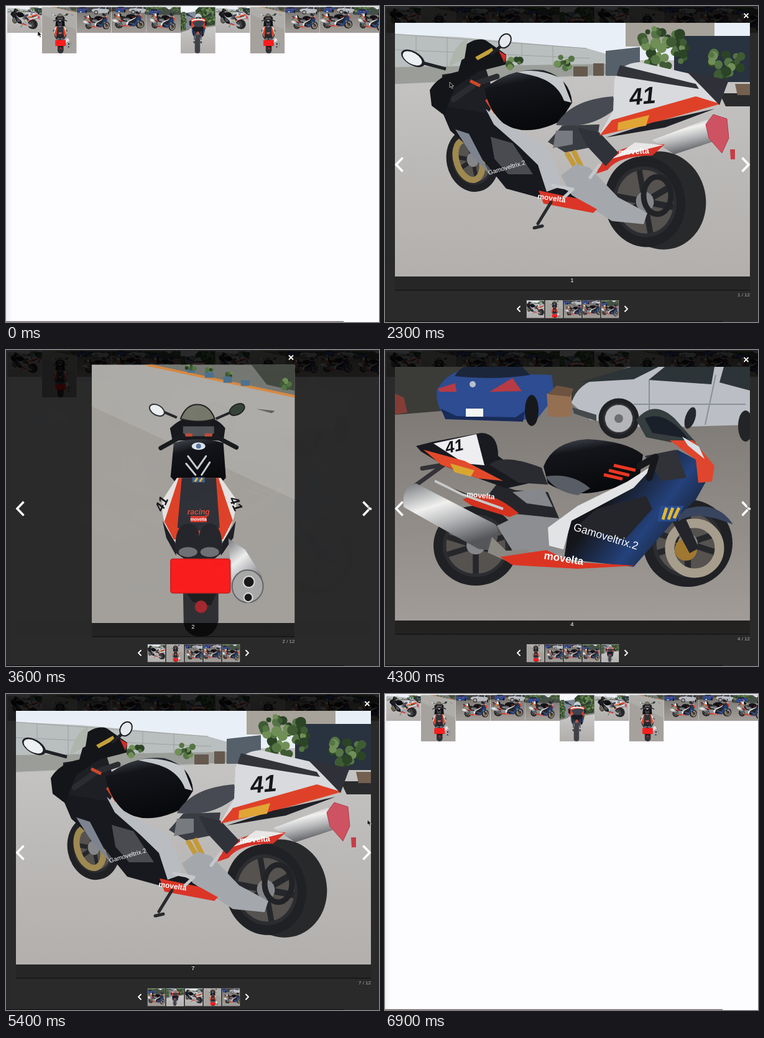
Animation, 600 px wide and 507 px high, one loop 7 s. Source, as an HTML page:

```html
<!DOCTYPE html>
<html lang="en">
<head>
<meta charset="utf-8">
<title>Photo lightbox</title>
<style>
html, body { margin: 0; width: 100%; height: 100%; overflow: hidden; background: #fdfcfe }
svg { display: block; width: 600px; height: 507px }
text { font-family: "Liberation Sans", Arial, sans-serif; fill: #fff }
.num { font-weight: 900; font-style: italic; fill: #16161a }
.line { fill: none; stroke-linecap: round; stroke-linejoin: round }
</style>
</head>
<body>
<svg id="stage" viewBox="0 0 600 507">
<defs>
  <linearGradient id="edge"><stop stop-color="#eeeef0"/><stop offset="1" stop-color="#fdfcfe"/></linearGradient>
  <linearGradient id="yard" x2="0" y2="1"><stop stop-color="#cbcac9"/><stop offset=".5" stop-color="#bcbab8"/><stop offset="1" stop-color="#b1aeac"/></linearGradient>
  <linearGradient id="floor" x2="0" y2="1"><stop stop-color="#77736f"/><stop offset="1" stop-color="#a39e99"/></linearGradient>
  <linearGradient id="steel" x2=".45" y2="1"><stop stop-color="#74777a"/><stop offset=".4" stop-color="#f0f0ef"/><stop offset=".65" stop-color="#b5b6b8"/><stop offset="1" stop-color="#55565a"/></linearGradient>
  <linearGradient id="paint" x2="1" y2=".6"><stop offset=".4" stop-color="#15161b"/><stop offset=".7" stop-color="#24427c"/><stop offset="1" stop-color="#15161b"/></linearGradient>
  <linearGradient id="gloss" x2=".3" y2="1"><stop stop-color="#4b505a"/><stop offset=".3" stop-color="#14151a"/><stop offset="1" stop-color="#08090c"/></linearGradient>

  <g id="wheel">
    <circle r="50" fill="#202124"/><circle r="38" fill="#55524f"/>
    <path d="M0,-38V38M-36,-12 36,12M-36,12 36,-12" stroke="#26272b" stroke-width="7"/>
    <circle r="37" fill="none" stroke="#2c2d31" stroke-width="4"/><circle r="11" fill="#85868a"/>
  </g>

  <g id="sideBike">
    <use href="#wheel" transform="translate(146 314) scale(1.36 1.28)"/>
    <use href="#wheel" transform="translate(487 310) scale(1.44 1.4)"/>
    <circle cx="498" cy="318" r="40" fill="none" stroke="#a69d8d" stroke-width="15"/>
    <circle cx="484" cy="320" r="18" fill="#a07832"/>
    <path d="M455,262 478,258 505,318 490,326Z" fill="#23252b"/>
    <path d="M470,260Q530,235 560,280Q500,255 472,275Z" fill="#39455f"/>
    <path d="M180,282 230,258 280,270 290,325 210,330Z" fill="#8c8e91"/>
    <path d="M180,215 210,225 262,228 280,270 200,262 160,240Z" fill="#25262b"/>
    <path d="M205,228 255,222 270,252 228,246Z" fill="#85878c"/>
    <path d="M125,240Q165,218 215,262L200,268 140,250Z" fill="#d5321f"/>
    <path d="M80,210 125,232 190,255" stroke="#c8c9ca" stroke-width="4"/>
    <path d="M60,190 95,184 48,218" class="line" stroke="#333238" stroke-width="7"/>
    <path d="M30,252Q26,218 50,214L178,280Q188,298 172,322L150,319Z" fill="url(#steel)"/>
    <path d="M172,300 195,322 230,320 245,340 210,345 165,325Z" fill="#8b8781"/>
    <path d="M50,154 78,147 155,133Q182,134 182,170L240,212 195,222 100,188 58,163Z" fill="#191a20"/>
    <path d="M78,150 147,135 160,185 128,182Z" fill="#eeeef0"/>
    <path d="M62,160 128,178 190,210 150,206 90,184Z" fill="#e34a2b"/>
    <text class="num" transform="translate(99 166) rotate(-12)" font-size="26">41</text>
    <path d="M105,182 144,193 138,203 112,196Z" fill="#d9a62f"/>
    <path d="M168,184Q190,165 252,189L262,216 215,213Z" fill="#2a2b30"/>
    <path d="M255,187Q270,147 325,143Q388,146 415,168L408,212 350,226Q300,238 262,214Z" fill="url(#gloss)"/>
    <path d="M258,203Q300,196 330,222L310,233Q275,228 258,203Z" fill="#595d65"/>
    <path d="M368,185 403,193M360,193 393,201M352,200 382,207" stroke="#ea3722" stroke-width="5"/>
    <path d="M298,270 395,215 470,160 528,190 500,240 470,268 400,348 288,335Z" fill="url(#paint)"/>
    <path d="M340,255 420,234 430,255 385,305 310,282Z" fill="#24262c"/>
    <path d="M262,285 310,250 390,211 437,181 400,221 300,274 287,320 264,314Z" fill="#e2e3e4"/>
    <path d="M404,112Q432,78 466,110L500,148 460,148 420,140Z" fill="#363d3f"/>
    <path d="M418,110Q450,95 488,142L430,133Z" fill="#1a2029"/>
    <path d="M458,145 496,145 530,186 526,211 504,213 500,176Z" fill="#e0452d"/>
    <path d="M478,139 505,155 514,175 487,153Z" fill="#d8e0e7"/>
    <path d="M418,170 468,160 485,205 445,210Z" fill="#303238"/>
    <path d="M410,186 435,172 425,205" class="line" stroke="#17181c" stroke-width="11"/>
    <ellipse cx="491" cy="109" rx="8" ry="18" transform="rotate(18 491 109)" fill="#24272c"/>
    <path d="M185,332 260,321 300,340 405,346 310,351 205,345Z" fill="#dc3422"/>
    <path d="M443,250 481,250 468,275 438,275Z" fill="#274c91"/>
    <path d="M447,272 453,253M456,272 463,253M465,270 473,253" stroke="#e2b82f" stroke-width="5"/>
    <text transform="translate(302 289) rotate(17)" font-size="17.5">Gamoveltrix.2</text>
    <text transform="translate(255 335) rotate(9)" font-size="17" font-weight="700">movelta</text>
    <text transform="translate(131 235) rotate(6)" font-size="12" font-weight="700">movelta</text>
  </g>

  <g id="blueCar">
    <path d="M83,65Q98,38 125,32Q185,15 235,39L268,40 273,75 245,110 220,112 98,107Q82,92 83,65Z" fill="#2d4c91"/>
    <path d="M112,42Q125,18 165,22H215L234,40Q175,49 112,42Z" fill="#1c263b"/>
    <path d="M85,62 113,53 115,67 88,67ZM168,67 205,45 220,66Z" fill="#b63b45"/>
    <ellipse cx="236" cy="97" rx="11" ry="25" fill="#17181b"/>
    <path d="M90,94 115,106 210,108 225,98 222,115 97,111Z" fill="#192b59"/>
    <rect x="130" y="94" width="28" height="13" fill="#f4f4f2"/>
    <circle cx="141" cy="55" r="5" fill="#b9c0cc"/>
  </g>
  <g id="silverCar">
    <path d="M300,85Q310,52 350,44L415,18H587V120L420,125 330,112Z" fill="#bbbec4"/>
    <path d="M312,52 405,24 440,27 400,47ZM424,48 450,27H530L525,55ZM538,52 545,27H587V65Z" fill="#2d3438"/>
    <path d="M425,48V118M532,40 515,120M400,87H580" stroke="#8b9097" stroke-width="2"/>
    <path d="M301,92 340,104V114L304,102Z" fill="#45484c"/>
    <use href="#wheel" transform="translate(376 110) scale(.65)"/>
    <circle cx="376" cy="110" r="22" fill="#b3b5b9"/><circle cx="376" cy="110" r="7" fill="#6c6e72"/>
    <ellipse cx="580" cy="122" rx="12" ry="25" fill="#232427"/>
  </g>

  <symbol id="p0" viewBox="16 27 571 429" preserveAspectRatio="xMidYMid slice">
    <rect x="16" y="27" width="571" height="429" fill="url(#yard)"/>
    <rect x="16" y="27" width="571" height="60" fill="#e9eff6"/>
    <path d="M16,45 120,50 325,68 360,78V112L16,126Z" fill="#b9bfbe"/>
    <path d="M16,45 325,68M16,70 330,84M50,48V122M100,50V118M220,60V112M270,64V110" stroke="#9aa19f" fill="none"/>
    <path d="M16,98 355,93V110L16,125Z" fill="#9a9d98"/>
    <path d="M387,27H530V65H387Z" fill="#a7a39a"/><path d="M355,72 410,66V112H355Z" fill="#56606a"/>
    <path d="M465,48H587V122H465Z" fill="#29323f"/>
    <path d="M303,97H326V113H303ZM335,92H352V112H335Z" fill="#65594e"/>
    <g data-leaves="408 32 78 70 50"/><g data-leaves="518 70 60 42 25"/><g data-leaves="275 78 28 22 12"/><g data-leaves="195 84 26 16 8"/>
    <path d="M538,140H587V161H548Z" fill="#292b2d"/><path d="M563,125H587V143H567Z" fill="#74604f"/>
    <use href="#wheel" transform="translate(141 247) rotate(-12) scale(.84 1.03)"/>
    <ellipse cx="135" cy="247" rx="20" ry="33" transform="rotate(-18 135 247)" fill="none" stroke="#9f8951" stroke-width="10"/>
    <path d="M430,215 518,182 542,213 465,238Z" fill="url(#steel)"/>
    <ellipse cx="445" cy="312" rx="71" ry="79" transform="rotate(-12 445 312)" fill="#28292b"/>
    <use href="#wheel" transform="translate(418 314) rotate(-10) scale(1.3 1.46)"/>
    <ellipse cx="438" cy="304" rx="22" ry="30" fill="none" stroke="#222326" stroke-width="9"/>
    <path d="M92,110 162,100 178,150 165,175 90,172Z" fill="#1d1f24"/>
    <path d="M88,160 165,172 250,230 282,290 340,323 250,308 195,293 160,250 105,200Z" fill="#17191e"/>
    <path d="M113,198 135,205 170,272 140,240Z" fill="#7d8490"/>
    <path d="M170,210 205,220 238,270 198,270 176,245Z" fill="#494b50"/>
    <path d="M72,135Q85,112 118,105L130,62Q148,50 162,55L195,78 194,94 150,105 113,130 95,175 75,160Z" fill="#141519"/>
    <path d="M102,98Q115,55 133,53L128,84Z" fill="#afb5ac"/>
    <path d="M145,82 172,67 175,73 149,87Z" fill="#c3a13b"/><path d="M183,72 195,79 192,91Z" fill="#cf2f29"/>
    <path d="M60,91 98,101M170,78 188,63" stroke="#202126" stroke-width="5"/>
    <ellipse cx="45" cy="84" rx="21" ry="11" transform="rotate(30 45 84)" fill="#202228"/>
    <ellipse cx="44" cy="84" rx="17" ry="9" transform="rotate(30 44 84)" fill="#eef1f3"/>
    <ellipse cx="193" cy="56" rx="9" ry="12" transform="rotate(30 193 56)" fill="#e6eaee" stroke="#202228" stroke-width="2"/>
    <path d="M110,150 145,125 180,113" class="line" stroke="#2a2c31" stroke-width="9"/>
    <path d="M137,120 153,128M163,150 178,172" stroke="#d2482b" stroke-width="5"/>
    <path d="M160,132Q205,98 255,103Q298,116 301,155L282,185Q225,212 190,188Q165,165 160,132Z" fill="url(#gloss)"/>
    <path d="M212,106Q245,98 285,117L300,155 288,152Q276,120 235,111Z" fill="#c5c8ca"/>
    <path d="M275,191Q298,150 367,145L372,164Q335,195 290,192Z" fill="#474a52"/>
    <path d="M262,218 285,192 345,190 340,225 290,235Z" fill="#393c42"/>
    <path d="M275,200H302V222L270,228Z" fill="#777a7e"/>
    <path d="M162,165 190,188 255,223Q282,260 282,290L260,298 246,255 215,225 175,190Z" fill="#b9bdc2"/>
    <path d="M292,235 310,265M303,232 316,258" stroke="#c49a38" stroke-width="8"/>
    <path d="M283,272 308,253 330,260 375,307 422,332 416,350 365,345 300,303Z" fill="#a4a8ad"/>
    <path d="M340,269Q358,218 450,222L430,240Q375,240 358,263Z" fill="#d63328"/>
    <path d="M365,245 402,219 448,223 420,230Z" fill="#e9e7e5"/>
    <path d="M310,195 345,203 375,235 355,257 325,225Z" fill="#303239"/>
    <path d="M369,118Q378,92 409,90L505,112 540,155 440,183 345,206 367,168Z" fill="#d8dade"/>
    <path d="M378,95 500,125 505,133 372,112Z" fill="#32343a"/>
    <path d="M345,208 365,183 500,145 540,157 430,188Z" fill="#df4128"/>
    <path d="M355,211 430,187 530,165 450,195Z" fill="#202127"/>
    <path d="M485,105 553,119 549,129 538,159 512,132Z" fill="#303138"/>
    <text class="num" x="393" y="157" font-size="38" transform="rotate(-5 418 145)">41</text>
    <path d="M375,187 425,175 420,192 374,200Z" fill="#e1a536"/>
    <path d="M516,190 528,174 550,181 553,212 542,236 521,212Z" fill="#cd5362" stroke="#b13c4b"/>
    <path d="M555,230H563V246H556Z" fill="#c53d46"/>
    <path d="M247,296 310,309 341,326 335,332 255,317Z" fill="#db3527"/>
    <path d="M267,315 246,349M240,356 253,353" class="line" stroke="#292a2d" stroke-width="5"/>
    <path d="M270,288 302,294 288,307M330,275 345,255" class="line" stroke="#c5c8cb" stroke-width="5"/>
    <text transform="translate(167 271) rotate(-16)" font-size="10">Gamoveltrix.2</text>
    <text transform="translate(245 309) rotate(8)" font-size="12" font-weight="700">movelta</text>
    <text transform="translate(376 239) rotate(-3)" font-size="13" font-weight="700">movelta</text>
  </symbol>

  <symbol id="p1" viewBox="138 23 327 437" preserveAspectRatio="xMidYMid slice">
    <rect x="138" y="23" width="327" height="437" fill="#a5a29e"/>
    <path d="M138,23H280L465,75V240L138,90Z" fill="#afada9"/>
    <path d="M235,23H465V74Z" fill="#777975"/><path d="M395,23H465V65L420,55Z" fill="#454a43"/>
    <path d="M226,23 465,74" stroke="#d98a43" stroke-width="4"/>
    <path d="M292,28h12v8h-12zM320,35h14v9h-14zM350,42h14v10h-14zM378,48h14v9h-14z" fill="#4d7390"/>
    <g data-leaves="290 23 15 8 5"/><g data-leaves="320 28 15 8 5"/><g data-leaves="350 33 15 10 5"/><g data-leaves="437 48 22 16 7"/>
    <path d="M403,94 433,97 428,101Z" fill="#65635f"/>
    <path d="M254,99 275,108M361,100 338,110" stroke="#26272c" stroke-width="4"/>
    <ellipse cx="243" cy="96" rx="13" ry="8" transform="rotate(30 243 96)" fill="#eef2f4" stroke="#303238" stroke-width="2"/>
    <ellipse cx="372" cy="95" rx="13" ry="8" transform="rotate(-30 372 95)" fill="#36443a" stroke="#222" stroke-width="2"/>
    <path d="M264,125Q285,105 308,105Q338,105 353,125L350,145H268Z" fill="#18191d"/>
    <path d="M281,110Q290,86 309,87Q328,88 336,110Q310,118 281,110Z" fill="#77796c" stroke="#222" stroke-width="2"/>
    <path d="M285,122H335V138H285Z" fill="#52565a"/>
    <path d="M249,157 285,137M371,156 335,137" class="line" stroke="#1a1b1f" stroke-width="7"/>
    <path d="M289,136H300M320,136H332" stroke="#c54b37" stroke-width="5"/>
    <path d="M270,149Q310,137 350,149L354,205 338,220H280L265,203Z" fill="url(#gloss)"/>
    <ellipse cx="310" cy="154" rx="11" ry="6" fill="#dce5ec"/><circle cx="310" cy="154" r="4" fill="#5877a0"/>
    <path d="M293,170 308,190 322,170M290,182 305,200M328,180 315,200" class="line" stroke="#c9cdd2" stroke-width="3"/>
    <path d="M275,205H346L371,240Q370,275 350,306H270Q248,275 252,240Z" fill="#e6e5e4"/>
    <path d="M278,205H342L365,273 349,304H270L255,275Z" fill="#df4328"/>
    <path d="M283,205H338L344,285Q310,294 276,285Z" fill="#30333a"/>
    <path d="M300,204H320V212H300Z" fill="#42669b"/><path d="M304,211 308,205M312,211 316,205" stroke="#e6ba3a" stroke-width="3"/>
    <text class="num" transform="translate(252 260) rotate(-65)" font-size="21">41</text>
    <text class="num" transform="translate(359 239) rotate(65)" font-size="21">41</text>
    <path d="M252,274 273,310 274,330 258,301ZM370,274 348,310 346,330 366,301Z" fill="#202127"/>
    <path d="M273,325Q270,278 294,278Q311,279 311,300Q312,279 329,278Q350,280 348,325L335,335H287Z" fill="#25262c"/>
    <ellipse cx="293" cy="324" rx="15" ry="8" fill="#707177"/><ellipse cx="328" cy="324" rx="15" ry="8" fill="#707177"/>
    <text x="310" y="264" text-anchor="middle" font-size="12" font-style="italic" font-weight="700" style="fill:#e14b38">racing</text>
    <path d="M297,266H323V276H297Z" fill="#df3d30"/><text x="310" y="274" text-anchor="middle" font-size="7" font-weight="700">movelta</text>
    <path d="M358,302 385,320 412,363Q414,402 383,404L364,380Z" fill="url(#steel)"/>
    <ellipse cx="389" cy="379" rx="25" ry="26" fill="#a9aaa9" stroke="#656668" stroke-width="2"/>
    <path d="M285,380H342V435Q336,460 314,460Q290,460 286,438Z" fill="#303134"/>
    <path d="M272,360H352L330,410 300,404Z" fill="#1d1e21"/>
    <circle cx="314" cy="412" r="10" fill="#a62830"/>
    <g fill="#18191b" stroke="#ddd" stroke-width="2"><circle cx="391" cy="372" r="9"/><circle cx="390" cy="397" r="7"/></g>
    <rect x="265" y="335" width="96" height="55" rx="4" fill="#fc1d1d" stroke="#c52123" stroke-width="1.5"/>
  </symbol>

  <symbol id="p2" viewBox="16 27 571 429" preserveAspectRatio="xMidYMid slice">
    <rect x="16" y="27" width="571" height="429" fill="url(#floor)"/>
    <rect x="16" y="27" width="571" height="86" fill="#40413c"/>
    <use href="#blueCar" x="-60" y="8"/><use href="#silverCar" x="-40" y="6"/>
    <use href="#sideBike" transform="translate(95 40) scale(.83 .93)"/>
  </symbol>

  <symbol id="p3" viewBox="16 27 571 429" preserveAspectRatio="xMidYMid slice">
    <rect x="16" y="27" width="571" height="429" fill="url(#floor)"/>
    <path d="M16,27H430V70L16,104Z" fill="#3b3c38"/><path d="M16,70 30,76 36,100 16,104Z" fill="#843d36"/>
    <use href="#blueCar"/><use href="#silverCar"/>
    <path d="M260,70 300,65V107H263Z" fill="#946f51"/><path d="M262,71 276,57 303,62 298,75Z" fill="#6e5440"/>
    <use href="#sideBike"/>
  </symbol>

  <symbol id="p4" viewBox="16 27 571 429" preserveAspectRatio="xMidYMid slice">
    <rect x="16" y="27" width="571" height="429" fill="url(#floor)"/>
    <rect x="16" y="27" width="571" height="130" fill="#465047"/>
    <path d="M330,27H470L400,70Z" fill="#e1e7e9"/>
    <g data-leaves="16 27 290 90 50"/><g data-leaves="430 30 150 80 35"/>
    <use href="#blueCar" x="-20" y="45"/>
    <use href="#sideBike" transform="translate(85 -20) rotate(7) scale(.82 1.03)"/>
  </symbol>

  <symbol id="p5" viewBox="138 23 327 437" preserveAspectRatio="xMidYMid slice">
    <rect x="138" y="23" width="327" height="437" fill="#f4f6f9"/>
    <path d="M165,82 290,65V195L190,250 165,240Z" fill="#858d9b"/>
    <path d="M180,81V240M200,79V238M220,76V230M240,73V220M262,70V210" stroke="#717a88" stroke-width="2"/>
    <path d="M138,75 175,90 190,250H138ZM275,58 310,23H465V205H350Z" fill="#34482f"/>
    <g data-leaves="138 65 50 180 65"/><g data-leaves="285 30 175 165 120"/>
    <path d="M138,265 250,227 345,210 465,194V460H138Z" fill="url(#yard)"/>
    <path d="M138,246 220,227V238L138,265ZM345,210 465,190V203L350,222Z" fill="#83847e"/>
    <path d="M222,105 252,122M394,106 350,122" stroke="#202329" stroke-width="7"/>
    <ellipse cx="205" cy="96" rx="23" ry="11" transform="rotate(30 205 96)" fill="#303843"/>
    <ellipse cx="408" cy="98" rx="23" ry="11" transform="rotate(-30 408 98)" fill="#303843"/>
    <path d="M242,220 270,205H350L372,220 353,295 329,312 270,310 251,285Z" fill="#1b1d23"/>
    <path d="M242,232 253,231 258,285 245,270ZM366,231 352,231 346,285 360,266Z" fill="#334b7c"/>
    <path d="M218,160 250,130Q303,112 360,130L385,158 383,189 366,209 238,207 217,190Z" fill="#e5422a"/>
    <path d="M218,155 240,151 238,207 220,193ZM384,155 365,151 365,206 386,185Z" fill="#242730"/>
    <path d="M246,143Q303,122 361,143L373,158Q303,134 236,159Z" fill="#f1f1f0"/>
    <path d="M248,170Q303,140 364,163L342,206Q303,220 270,205Z" fill="#3b4351"/>
    <path d="M271,135Q269,86 304,85Q339,87 338,135Q303,120 271,135Z" fill="#c8d0d2" stroke="#6f777a" stroke-width="2"/>
    <path d="M280,121Q303,112 330,122L334,134H275Z" fill="#292d33"/>
    <path d="M292,122H313V132H292Z" fill="#3c609b"/><path d="M296,131 300,123M304,131 308,123" stroke="#e2b73d" stroke-width="3"/>
    <path d="M233,199 250,217 243,229ZM373,202 351,220 361,229Z" fill="#e54b2a"/>
    <path d="M225,229 235,225 238,231 230,235ZM379,232 369,228 365,235 374,237Z" fill="#e69a32"/>
    <path d="M263,250 277,252 273,330 262,329ZM323,252 337,250 337,330 325,330Z" fill="#303d58"/>
    <path d="M255,348H275V365H262ZM320,348H338V365H325Z" fill="#3c3e44"/>
    <rect x="271" y="267" width="50" height="193" rx="24" fill="#43454a"/>
    <path d="M286,300Q280,360 284,440M306,300Q312,360 308,440M296,325V455" fill="none" stroke="#34363a" stroke-width="3"/>
    <path d="M284,280 287,260Q300,251 311,260L321,284H282Z" fill="#e34028"/>
    <path d="M283,270H314L312,281H284Z" fill="#365b98"/><path d="M290,280 294,271M300,280 305,271" stroke="#e8bd43" stroke-width="4"/>
    <text transform="translate(271 288) rotate(94)" font-size="9" font-weight="700">GARVEK</text>
    <text transform="translate(327 288) rotate(86)" font-size="9" font-weight="700">GARVEK</text>
  </symbol>
</defs>

<rect width="600" height="507" fill="#fdfcfe"/>
<rect width="10" height="507" fill="url(#edge)"/>
<g id="gallery"/>
<path d="M0,506.5H543" stroke="#6d6062" stroke-width="1.5"/>
<g id="lightbox">
  <rect width="600" height="507" fill="#000" opacity=".83"/>
  <g id="panels"/><g id="thumbs"/>
  <g class="line" stroke="#fff">
    <path d="M217,482 213,486 217,490M386,482 390,486 386,490" stroke-width="1.8"/>
    <path d="M28.5,243.5 18,254.5 28.5,265.5M574.5,243.5 585,254.5 574.5,265.5" stroke-width="3.6" stroke-linecap="butt" stroke-linejoin="miter"/>
  </g>
</g>
<g id="cursor">
  <path id="arrow" d="M0,0V9L2,7 3.8,10.5 5.3,9.7 3.7,6.5H6.5Z" fill="#111" stroke="#fff" stroke-width=".6"/>
  <path id="hand" d="M1.5,0Q2.6,0 2.6,3L6,4Q7,5 6,8H2.5L0,5 1,4V.7Z" fill="#fff" stroke="#222" stroke-width=".6"/>
</g>
</svg>
<script>
const $ = id => document.getElementById(id);
const clamp = (v, a = 0, b = 1) => Math.min(b, Math.max(a, v));
const isTall = i => i % 6 === 1 || i % 6 === 5;
const photo = (i, x, y, w, h) => `<use href="#p${i % 6}" x="${x}" y="${y}" width="${w}" height="${h}"/>`;

let seed = 7;
const random = () => (seed = seed * 16807 % 2147483647) / 2147483647;
const greens = ['#2c4426', '#3f5b34', '#547544', '#6f8f56'];
for (const g of document.querySelectorAll('[data-leaves]')) {
  const [x, y, w, h, count] = g.dataset.leaves.split(' ').map(Number);
  const size = Math.sqrt(w * h / count) * .75;
  for (let i = 0; i < count; i++) {
    const a = random() * 6.283, r = Math.sqrt(random()) / 2;
    g.innerHTML += `<circle cx="${x + w / 2 + w * r * Math.cos(a)}" cy="${y + h / 2 + h * r * Math.sin(a)}" r="${size * (.5 + random() * .6)}" fill="${greens[i % 4]}"/>`;
  }
}

for (let i = 0; i < 11; i++)
  $('gallery').innerHTML += photo(i, 2 + i * 55.8, 1.5, 55.8, isTall(i) ? 74.4 : 41.8);

function panel(i) {
  const [x, y, w, h] = isTall(i) ? [138, 23.5, 326.5, 436.5] : [16, 27, 571, 429];
  const right = x + w, bottom = y + h;
  return `<g>${photo(i, x, y, w, h)}
    <rect x="${x}" y="${bottom - 22}" width="${w}" height="22" opacity=".78"/>
    <path d="M${x},${bottom}H${right}" stroke="#0c0c0c"/>
    <text x="301" y="${bottom - 13.5}" font-size="9.5" text-anchor="middle">${i + 1}</text>
    <text x="${right}" y="${bottom + 9.5}" font-size="8" text-anchor="end" style="fill:#b2b1b3">${i + 1} / 12</text>
    <path d="M${right - 9.5},${y - 15}l7,7m0,-7l-7,7" stroke="#fff" stroke-width="1.8"/></g>`;
}
for (let i = 0; i < 7; i++) $('panels').innerHTML += panel(i);

for (let i = 0; i < 5; i++)
  $('thumbs').innerHTML += photo(i, 228 + i * 30, 472.5, 28, 28) +
    `<rect x="${228 + i * 30}" y="472.5" width="28" height="28" fill="none" stroke="#fff" stroke-opacity=".25"/>`;
const panels = [...$('panels').children], thumbs = $('thumbs').querySelectorAll('use');

const LOOP = 7000, FADE = 250;
const opens = [0, 3100, 3600, 3950, 4350, 4620, 4950, LOOP + FADE];
const path = [[0, 51, 40], [300, 102, 64], [400, 102, 64], [800, 41, 32], [1200, 78, 62], [1500, 45, 34],
  [2000, 45, 34], [2300, 104, 122], [2800, 582, 249], [5200, 582, 249], [5900, 578, 12], [6500, 578, 11], [6900, 577, 10], [LOOP, 577, 10]];

function pointer(t) {
  const n = path.findIndex(p => p[0] > t);
  const [t0, x0, y0] = path[n - 1], [t1, x1, y1] = path[n];
  const k = (t - t0) / (t1 - t0), s = k * k * (3 - 2 * k);
  return [x0 + (x1 - x0) * s, y0 + (y1 - y0) * s];
}

function draw(t) {
  const shown = clamp((t - 1600) / 200) * clamp((6900 - t) / 300);
  $('lightbox').style.opacity = shown;
  $('lightbox').style.display = shown ? '' : 'none';
  panels.forEach((p, i) => {
    const enter = i ? clamp((t - opens[i]) / FADE) : 1;
    const alpha = enter * (1 - clamp((t - opens[i + 1]) / FADE));
    p.style.opacity = alpha;
    p.style.display = alpha ? '' : 'none';
  });
  const current = opens.filter(o => o <= t).length - 1;
  const first = clamp(current - 2, 0, 7);
  thumbs.forEach((u, i) => u.setAttribute('href', '#p' + (first + i) % 6));
  const onLink = t > 2700 && t < 5300 || t > 5850 && t < 6700;
  $('arrow').style.display = onLink ? 'none' : '';
  $('hand').style.display = onLink ? '' : 'none';
  $('cursor').setAttribute('transform', `translate(${pointer(t)})`);
}

const start = performance.now();
(function tick() {
  draw((performance.now() - start) % LOOP);
  requestAnimationFrame(tick);
})();
</script>
</body>
</html>
```
